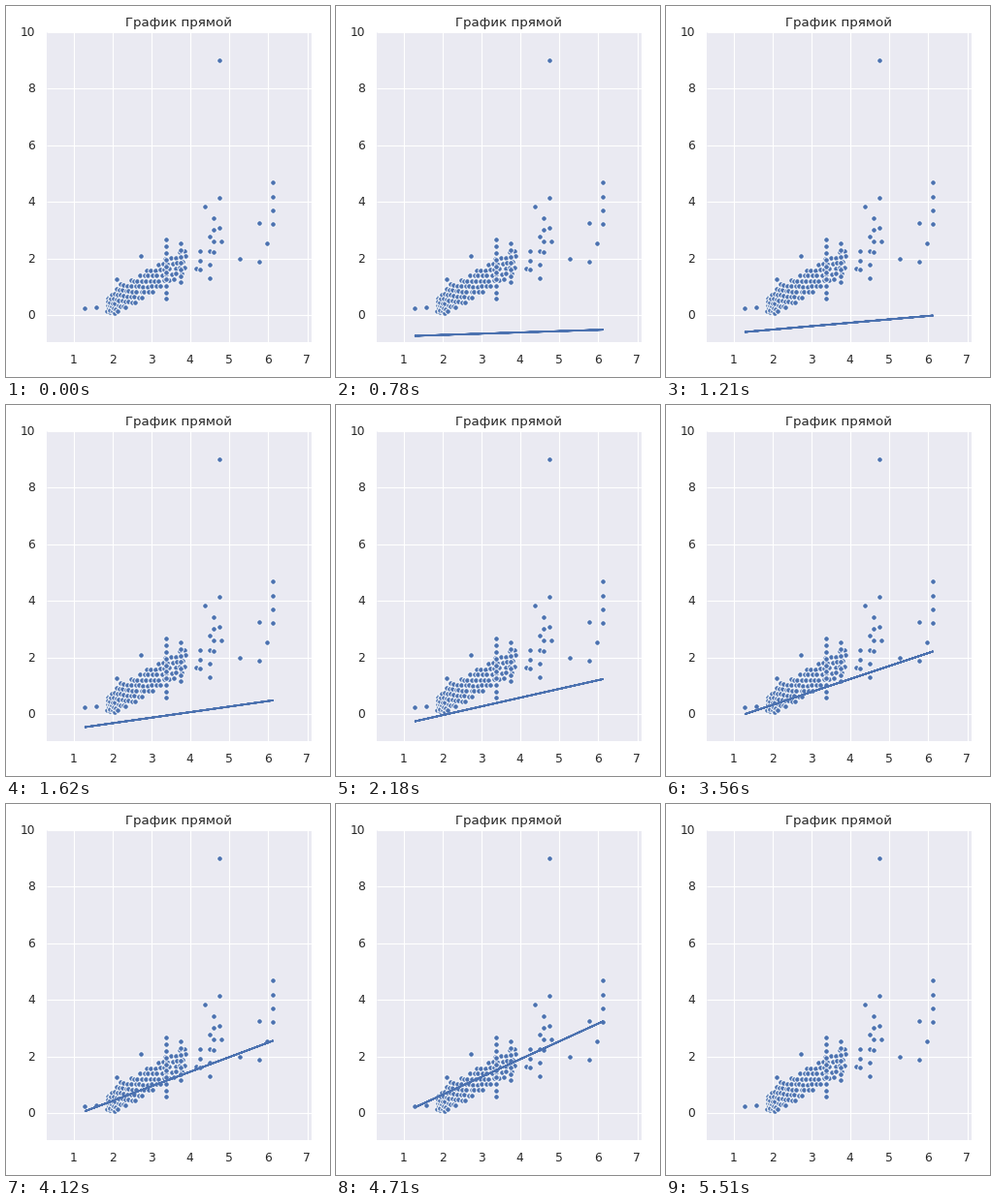
These frames come from a looping animation (334 px wide and 383 px high, 5630 ms). A matplotlib script:

```python
import numpy as np
import matplotlib.pyplot as plt
from matplotlib.animation import FuncAnimation
from matplotlib.patches import Rectangle

W, H, DPI = 334, 383, 80
LOOP_MS, TICK_MS = 5630, 10
LEFT, RIGHT, TOP, BOTTOM = 42, 315, 27, 347
BLUE, INK, PANEL = "#4c72b0", "#262626", "#eaeaf2"

plt.rcParams["font.family"] = "DejaVu Sans"
plt.rcParams["path.simplify"] = False


def px(n):
    """Pixels to points."""
    return n * 72 / DPI


def to_x(v):
    return 30.1 + 40.06 * v


def to_y(v):
    return 319.3 - 29.25 * v


def cloud(n):
    """Band of points rising to the right, densest at its lower left."""
    rng = np.random.default_rng(4)
    i = np.arange(n)
    run = 82 * ((i + 0.5) / n) ** 1.5
    spread = 2 * (i * 0.618034 % 1) - 1
    half = np.minimum(8 + 0.6 * run, 14)
    x = 104 + run + rng.uniform(-1, 1, n)
    return np.column_stack([x, 309 - 0.58 * run + half * spread])


def column(x, top, bottom, n):
    return np.column_stack([np.full(n, x), np.linspace(top, bottom, n)])


def scatter_points():
    lone = [(220, 56), (220, 198), (220, 229), (205, 207), (222, 243),
            (241, 261), (261, 224), (261, 264), (269, 245), (139, 258),
            (81, 312), (93, 311), (114, 282), (196, 271)]
    return np.vstack([
        cloud(110), lone,
        column(165, 241, 302, 10), column(180, 245, 285, 7),
        column(200, 253, 272, 3), column(210, 238, 281, 4),
        column(214, 219, 254, 4), column(275, 182, 225, 4),
    ]) + 0.4


# Bursts of evenly timed jumps: first ms, last ms, number of jumps
BURSTS = [(600, 930, 3), (1210, 2180, 6), (2360, 3330, 6),
          (3560, 4530, 6), (4710, 5110, 3)]
STEP_MS = np.concatenate([np.linspace(*burst) for burst in BURSTS])
HIDE_MS = 5510

# Jump index with the heights of the left and right line ends
KEYS = np.array([(0, 342.5, 341.5), (8, 326.5, 283), (12, 321, 261.7),
                 (15, 319, 254.5), (21, 313, 224.5), (22, 312, 217.5),
                 (23, 315.5, 232.5)])

fig = plt.figure(figsize=(W / DPI, H / DPI), dpi=DPI, facecolor="white")
ax = fig.add_axes([0, 0, 1, 1])
ax.set_xlim(0, W)
ax.set_ylim(H, 0)
ax.axis("off")

ax.add_patch(Rectangle((LEFT, TOP), RIGHT - LEFT, BOTTOM - TOP,
                       facecolor=PANEL, linewidth=0, zorder=0))
grid = dict(color="white", linewidth=1, solid_capstyle="butt", zorder=1)
label = dict(color=INK, fontsize=11)
for v in range(1, 8):
    ax.plot([to_x(v)] * 2, [TOP, BOTTOM], **grid)
    ax.text(to_x(v) - 0.6, 369, str(v), ha="center", va="baseline", **label)
for v in range(0, 11, 2):
    ax.plot([LEFT, RIGHT], [to_y(v)] * 2, **grid)
    ax.text(30, to_y(v) - 1, str(v), ha="right", va="center_baseline", **label)
ax.text((LEFT + RIGHT) / 2 - 0.8, 20.8, "График прямой", color=INK,
        fontsize=12, ha="center", va="baseline")

dots = scatter_points()
ax.plot(dots[:, 0], dots[:, 1], "o", color=BLUE, markersize=px(5.5),
        markeredgecolor="white", markeredgewidth=px(0.85), zorder=2)

# retraced a few times so the stroke edges stay crisp
PASSES = 3
fit, = ax.plot([81.7, 275] * PASSES, [0, 0] * PASSES, color=BLUE,
               linewidth=1.5, solid_capstyle="round",
               solid_joinstyle="round", zorder=3)


def draw(frame):
    now = frame * TICK_MS
    step = np.searchsorted(STEP_MS, now, side="right") - 1
    fit.set_visible(bool(step >= 0 and now < HIDE_MS))
    ends = [np.interp(step, KEYS[:, 0], KEYS[:, side]) for side in (1, 2)]
    fit.set_ydata(ends * PASSES)
    return [fit]


anim = FuncAnimation(fig, draw, frames=LOOP_MS // TICK_MS, interval=TICK_MS,
                     repeat=True, repeat_delay=0, blit=False)
plt.show()
```
